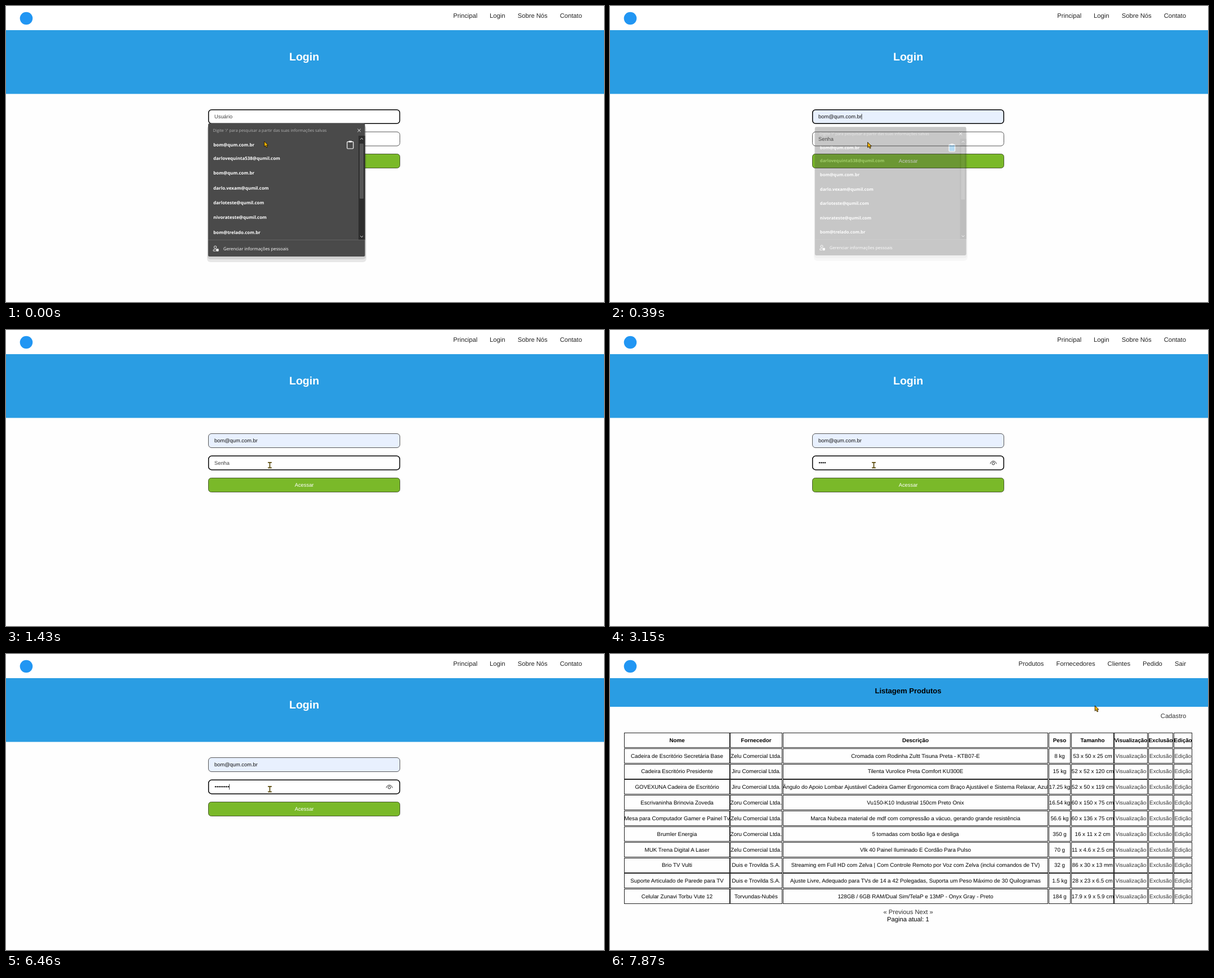
An HTML page that plays this animation: 1062x527 px, repeating every 7990 ms.

```html
<!DOCTYPE html>
<html lang="pt-BR">
<head>
<meta charset="utf-8">
<title>Login e listagem</title>
<style>
html, body { margin: 0; width: 100%; height: 100%; overflow: hidden; background: #fefefe; }
svg { display: block; width: 1062px; height: 527px; }
text { font-family: "Liberation Sans", Arial, sans-serif; text-rendering: geometricPrecision; white-space: pre; }
.nav { font-size: 11.2px; fill: #222; }
.field { font-size: 9.33px; fill: #111; }
.cell { font-size: 9.8px; fill: #000; text-anchor: middle; }
.link { fill: #333; }
.bold { font-weight: bold; }
.mid { text-anchor: middle; }
.hint { fill: #444; }
.pop text { font-family: "Open Sans", "Noto Sans", sans-serif; fill: #fff; }
.line { fill: none; stroke: #fff; stroke-width: .9; }
</style>
</head>
<body>
<svg viewBox="0 0 1062 527">
  <rect width="1062" height="43" fill="#fff"/>
  <rect id="band" y="43" width="1062" fill="#2a9de3"/>
  <circle cx="36" cy="22" r="11.3" fill="#2196f3"/>

  <g id="login">
    <g id="loginNav"></g>
    <text class="bold mid" x="529.6" y="97" font-size="19.6" fill="#fff">Login</text>
    <rect id="userBox" rx="5.5"/>
    <text id="userText" class="field" x="370" y="200.2"></text>
    <rect id="passBox" rx="5.5"/>
    <text id="passHint" class="field hint" x="370" y="239.6">Senha</text>
    <g id="dots" fill="#111"></g>
    <g id="eye" fill="none" stroke="#222">
      <path d="M675.3 238.3C677 231.8 684.5 231.8 686.2 238.3"/>
      <circle cx="680.7" cy="237.8" r="2.2"/>
    </g>
    <rect x="359.5" y="263.5" width="340" height="25" rx="5" fill="#7ab929" stroke="#3b4a24" stroke-width=".9"/>
    <text class="field mid" x="529.6" y="279" style="fill:#fff">Acessar</text>
    <rect id="caret" width=".8" height="10" fill="#111"/>

    <g id="popup" class="pop">
      <rect x="357" y="213" width="283" height="243" rx="6" opacity=".09"/>
      <rect x="358" y="211" width="281" height="240" rx="5" opacity=".1"/>
      <rect x="359" y="209" width="278.5" height="237" rx="2.5" fill="#4a4a4a"/>
      <text x="367.5" y="224.2" font-size="7.2" style="fill:#b4b4b4">Digite '/' para pesquisar a partir das suas informações salvas</text>
      <path class="line" d="M624.4 218.8l5.4 5.4m0-5.4l-5.4 5.4"/>
      <rect x="626" y="231" width="11.5" height="185" fill="#2d2d2d"/>
      <rect x="628" y="245" width="7" height="98" rx="1" fill="#565656"/>
      <path class="line" d="M629.3 237.7l2.4-2.4l2.4 2.4M629.3 409.3l2.4 2.4l2.4-2.4"/>
      <g id="emails" class="bold" font-size="7.95"></g>
      <rect id="clip" x="605.8" y="241.6" width="11" height="12.4" rx="1.2" class="line" style="stroke-width:1.2"/>
      <rect x="608.6" y="240" width="5.4" height="2.8" rx=".8" fill="#fff"/>
      <path d="M359 416.5h278.5" stroke="#686868" stroke-width=".8"/>
      <g class="line">
        <circle cx="371.6" cy="429.4" r="2.2"/>
        <path d="M372.5 436.2h-4.3v-1.6q0-1.4 1.6-1.4h2.7"/>
      </g>
      <rect x="373.2" y="432.2" width="4.4" height="4.6" rx=".8" fill="#fff"/>
      <text x="386" y="434.8" font-size="7.77">Gerenciar informações pessoais</text>
    </g>
  </g>

  <g id="list">
    <g id="listNav"></g>
    <text class="bold mid" x="529.5" y="70.3" font-size="13.05">Listagem Produtos</text>
    <text class="nav link" x="977.8" y="114.3">Cadastro</text>
    <g id="table" fill="none" stroke="#222"></g>
    <g id="tableText"></g>
    <text class="nav link mid" x="529.6" y="463.4">« Previous Next »</text>
    <text class="nav mid" x="529.4" y="476" style="fill:#000">Pagina atual: 1</text>
  </g>

  <g id="pointer">
    <path id="arrow" d="M0 0V9.4L2.2 7.5L3.9 11L5.6 10.2L4 6.9H6.9Z" fill="#f7b500" stroke="#1c1400" stroke-width=".9" stroke-linejoin="round"/>
    <path id="beam" d="M-3.4-4.7H3.4M-3.4 4.7H3.4M0-4.7V4.7" fill="none" stroke="#5a4a0c" stroke-width="1.7"/>
  </g>
</svg>
<script>
const LOOP = 7990, LIST_AT = 6600;
const $ = id => document.getElementById(id);

function add(parent, tag, attrs, text = '') {
  const el = document.createElementNS('http://www.w3.org/2000/svg', tag);
  set(el, attrs);
  el.textContent = text;
  return parent.appendChild(el);
}
function set(el, attrs) {
  for (const name in attrs) el.setAttribute(name, attrs[name]);
}
const show = (el, on) => { el.style.display = on ? '' : 'none'; };

function addNav(parent, items) {
  for (const [x, label] of items) add(parent, 'text', {class: 'nav', x, y: 21}, label);
}
addNav($('loginNav'), [[794.3, 'Principal'], [859, 'Login'], [908.8, 'Sobre Nós'], [983.7, 'Contato']]);
addNav($('listNav'), [[725.6, 'Produtos'], [792.6, 'Fornecedores'], [883.6, 'Clientes'], [946, 'Pedido'], [1003, 'Sair']]);

const EMAIL = 'bom@qum.com.br';
[EMAIL, 'darlovequinta538@qumil.com', EMAIL, 'darlo.vexam@qumil.com', 'darloteste@qumil.com',
  'nivorateste@qumil.com', 'bom@trelado.com.br'].forEach((mail, i) =>
  add($('emails'), 'text', {x: 368.3, y: i ? 247.4 + 26.4 * i : 249.9}, mail));

for (let i = 0; i < 8; i++) add($('dots'), 'circle', {cx: 372.1 + 3.27 * i, cy: 236.2, r: 1.2});

const columns = [[25, 212], [213, 305], [307, 777], [779, 817], [819, 894], [895, 954], [956, 999], [1001, 1033]];
const zelu = 'Zelu Comercial Ltda.', jiru = 'Jiru Comercial Ltda.', zoru = 'Zoru Comercial Ltda.', duis = 'Duis e Trovilda S.A.';
const actions = ['Visualização', 'Exclusão', 'Edição'];
const rows = [
  ['Nome', 'Fornecedor', 'Descrição', 'Peso', 'Tamanho'],
  ['Cadeira de Escritório Secretária Base', zelu, 'Cromada com Rodinha Zultt Tisuna Preta - KTB07-E', '8 kg', '53 x 50 x 25 cm'],
  ['Cadeira Escritório Presidente', jiru, 'Tilenta Vurolice Preta Comfort KU300E', '15 kg', '52 x 52 x 120 cm'],
  ['GOVEXUNA Cadeira de Escritório', jiru, 'Ângulo do Apoio Lombar Ajustável Cadeira Gamer Ergonomica com Braço Ajustável e Sistema Relaxar, Azul', '17.25 kg', '52 x 50 x 119 cm'],
  ['Escrivaninha Brinovia Zoveda', zoru, 'Vu150-K10 Industrial 150cm Preto Onix', '16.54 kg', '60 x 150 x 75 cm'],
  ['Mesa para Computador Gamer e Painel Tv', zelu, 'Marca Nubeza material de mdf com compressão a vácuo, gerando grande resistência', '56.6 kg', '60 x 136 x 75 cm'],
  ['Brumler Energia', zoru, '5 tomadas com botão liga e desliga', '350 g', '16 x 11 x 2 cm'],
  ['MUK Trena Digital A Laser', zelu, 'Vlk 40 Painel Iluminado E Cordão Para Pulso', '70 g', '11 x 4.6 x 2.5 cm'],
  ['Brio TV Vulti', duis, 'Streaming em Full HD com Zelva | Com Controle Remoto por Voz com Zelva (inclui comandos de TV)', '32 g', '86 x 30 x 13 mm'],
  ['Suporte Articulado de Parede para TV', duis, 'Ajuste Livre, Adequado para TVs de 14 a 42 Polegadas, Suporta um Peso Máximo de 30 Quilogramas', '1.5 kg', '28 x 23 x 6.5 cm'],
  ['Celular Zunavi Torbu Vute 12', 'Torvundas-Nubés', '128GB / 6GB RAM/Dual Sim/TelaP e 13MP - Onyx Gray - Preto', '184 g', '17.9 x 9 x 5.9 cm'],
];
rows.forEach((row, r) => [...row, ...actions].forEach((label, c) => {
  const [left, right] = columns[c];
  const top = 140 + 27.82 * r;
  add($('table'), 'rect', {x: left + .5, y: Math.round(top) + .5, width: right - left, height: 26});
  const style = r === 0 ? 'cell bold' : c > 4 ? 'cell link' : 'cell';
  add($('tableText'), 'text', {class: style, x: (left + right + 1) / 2, y: top + 16.8}, label);
}));

// Each key holds until the next one.
const at = (keys, t) => keys.findLast(key => key[0] <= t);
const pointerKeys = [
  [0, 458.7, 241, 'arrow'], [270, 457.6, 242.6, 'arrow'], [900, 468.5, 240.6, 'beam'],
  [6160, 468.5, 240.6, 'arrow'], [6460, 468.5, 240.6, 'beam'],
  [7510, 560, 186, 'arrow'], [7630, 735, 88, 'arrow'], [7750, 838, 50, 'arrow'], [7870, 861.2, 92, 'arrow'],
];
const popupKeys = [[0, 1, 1], [270, .7, .985], [390, .3, .965], [510, 0, 1]];
const typeTimes = [1930, 2330, 2480, 2780, 4590, 4990, 5130, 5380];
const caretOff = [[0, 150], [1430, 1930], [3150, 3680], [4210, 4590], [5880, 6460]];

function drawField(el, top, focused, fill) {
  const inset = focused ? .7 : .5;
  set(el, {
    x: 359 + inset, y: top + inset, width: 341 - 2 * inset, height: 26 - 2 * inset, fill,
    stroke: focused ? '#000' : '#444', 'stroke-width': focused ? 1.5 : .9,
  });
}

function render(t) {
  const listing = t >= LIST_AT;
  show($('login'), !listing);
  show($('list'), listing);
  set($('band'), {height: listing ? 51 : 113.5});

  const filled = t >= 150, onPass = t >= 900;
  drawField($('userBox'), 184, !onPass, filled ? '#e8f0fe' : '#fff');
  drawField($('passBox'), 223.6, onPass, '#fff');
  $('userText').textContent = filled ? EMAIL : 'Usuário';
  $('userText').classList.toggle('hint', !filled);

  const typed = typeTimes.filter(time => time <= t).length;
  [...$('dots').children].forEach((dot, i) => show(dot, i < typed));
  show($('passHint'), !typed);
  show($('eye'), typed);

  show($('caret'), !caretOff.some(([from, to]) => t >= from && t < to));
  set($('caret'), {x: onPass ? 370.2 + 3.27 * typed : 446.6, y: onPass ? 231.5 : 192});

  const [, opacity, scale] = at(popupKeys, t);
  show($('popup'), opacity);
  set($('popup'), {opacity, transform: `translate(498.2 389) scale(${scale}) translate(-498.2 -389)`});
  $('clip').style.fill = filled ? '#1890e0' : 'none';

  const [, x, y, shape] = at(pointerKeys, t);
  set($('pointer'), {transform: `translate(${x} ${y})`});
  for (const id of ['arrow', 'beam']) show($(id), id === shape);
}

function tick() {
  render(performance.now() % LOOP);
  requestAnimationFrame(tick);
}
tick();
</script>
</body>
</html>
```
